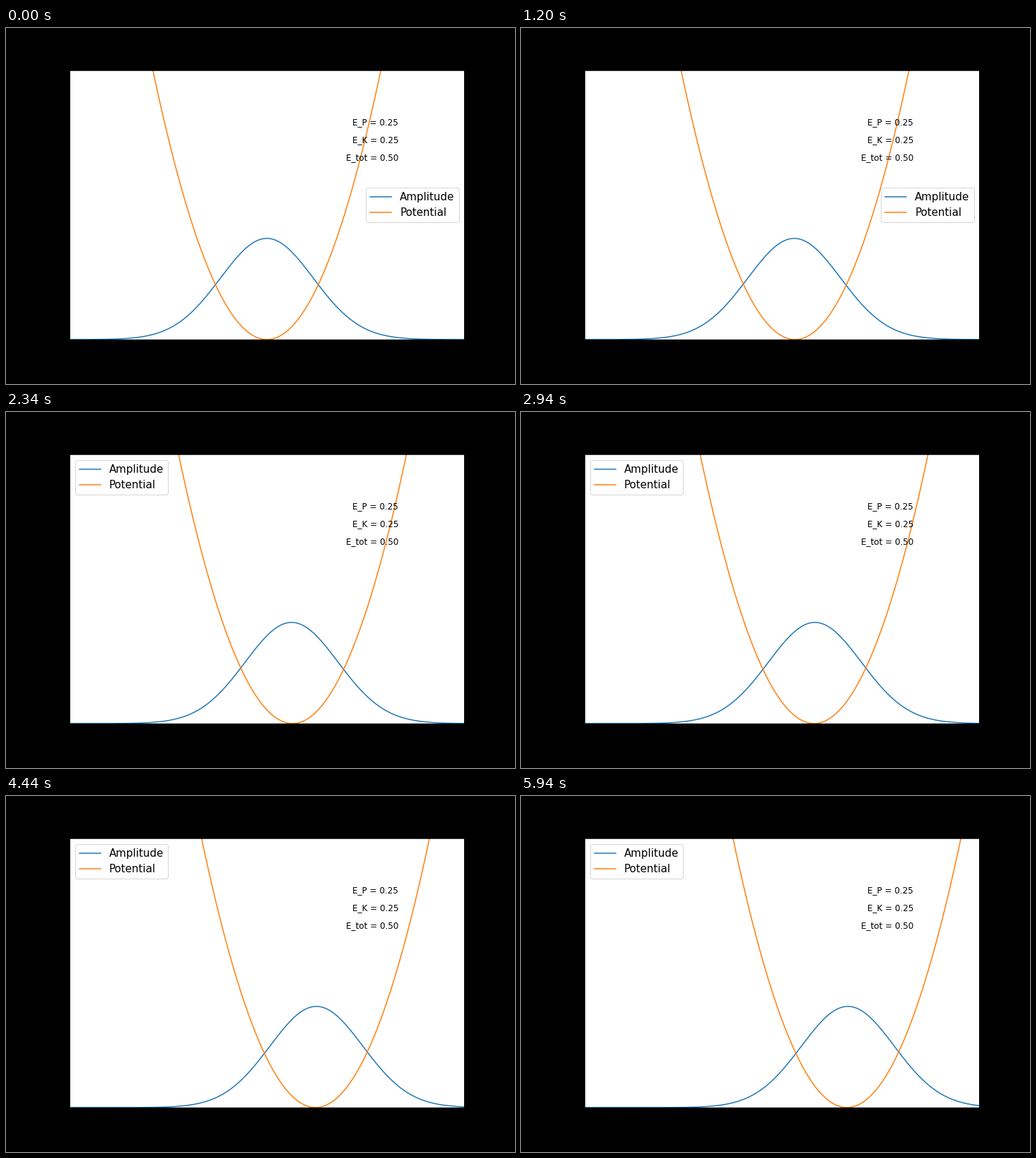
These frames come from a looping animation (720x504 px, 6000 ms). A matplotlib script:

```python
import numpy as np
import matplotlib.pyplot as plt
from matplotlib.animation import FuncAnimation

FRAMES = 100
INTERVAL = 60
STEP = 0.01  # trap displacement per frame

plt.rcParams["font.family"] = "DejaVu Sans"

x = np.linspace(-4, 4, 256)
dx = x[1] - x[0]


def density(center):
    """Ground state density, moved by whole grid cells."""
    shift = np.round(center / dx) * dx
    return np.exp(-(x - shift) ** 2) / np.sqrt(np.pi)


def potential(center):
    return 0.5 * (x - center) ** 2


fig = plt.figure(figsize=(10, 7), dpi=72, facecolor="black")
ax = fig.add_axes([0.125, 0.125, 0.775, 0.755])
ax.set(xlim=(-3, 3), ylim=(0, 1.5), xticks=[], yticks=[])

wave, = ax.plot(x, density(0), color="tab:blue", lw=1.5, label="Amplitude")
trap, = ax.plot(x, potential(0), color="tab:orange", lw=1.5, label="Potential")

energies = [("E_P", 0.25), ("E_K", 0.25), ("E_tot", 0.5)]
for row, (name, value) in enumerate(energies):
    ax.text(2, 1.2 - 0.1 * row, f"{name} = {value:.2f}", fontsize=12, ha="right")

# "best" lets the legend jump aside when the potential reaches it
ax.legend(loc="best", fontsize=15)


def update(i):
    center = STEP * i
    wave.set_ydata(density(center))
    trap.set_ydata(potential(center))
    return wave, trap


anim = FuncAnimation(fig, update, frames=FRAMES, interval=INTERVAL,
                     repeat=True, repeat_delay=0)
plt.show()
```
